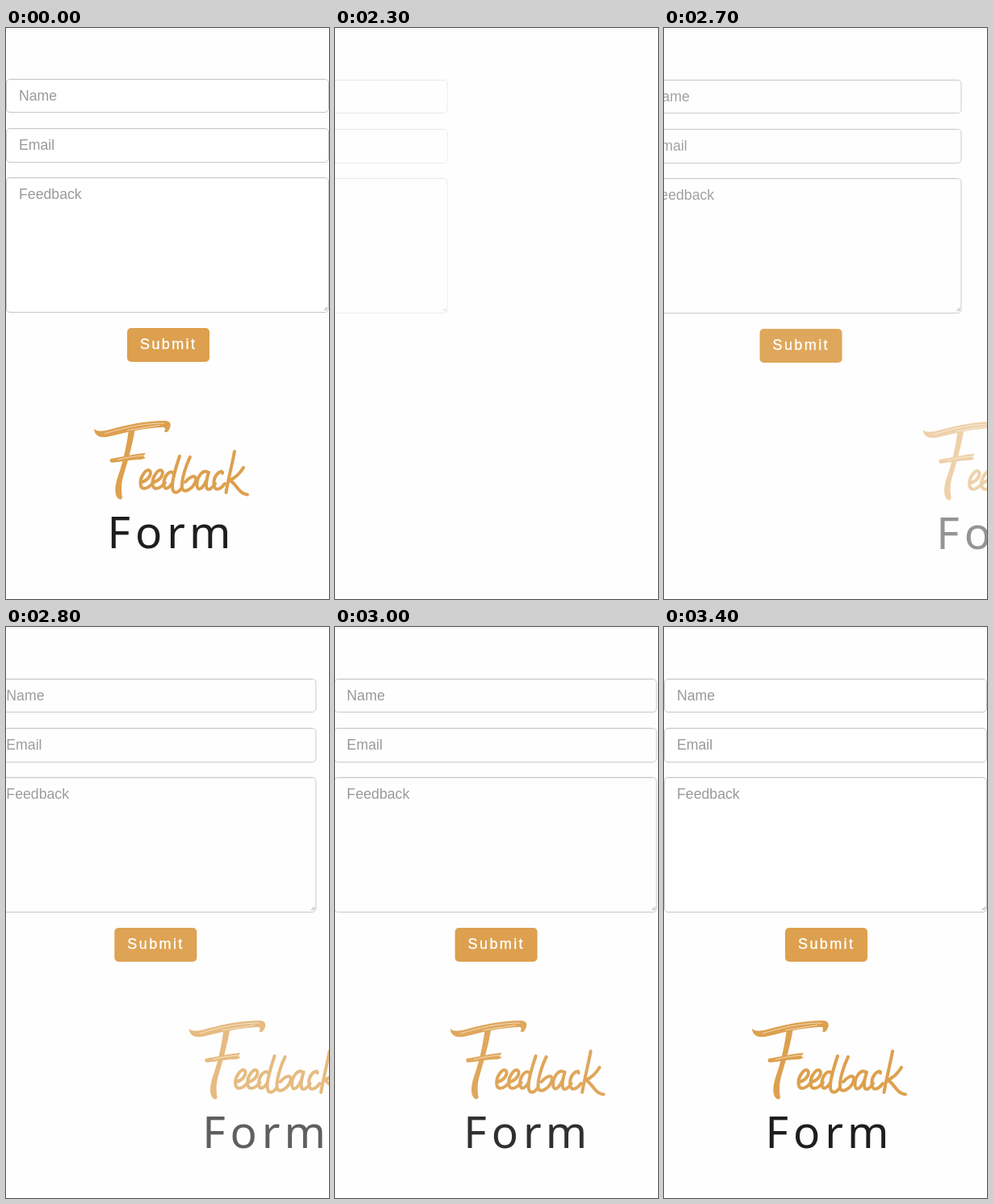
Recreate the animation shown at these times as an HTML page. Size 400 by 708 pixels, loop 3600 ms.

```html
<!DOCTYPE html>
<html lang="en">
<head>
<meta charset="utf-8">
<title>Feedback form</title>
<style>
  html, body { margin: 0; width: 100%; height: 100%; overflow: hidden; background: #fefefe; }
  svg { display: block; width: 100%; height: 100%; }
  text { font: 17.7px "Liberation Sans", Arial, sans-serif; fill: #999; }
  .field { fill: #fff; stroke: #c8c8c8; }
  .shade { fill: none; stroke: #f0f0f0; }
  .ink { fill: #dda04e; }
  .pen { fill: none; stroke: #dda04e; stroke-width: 4; stroke-linecap: round; stroke-linejoin: round; }
  .scratch { fill: none; stroke: #fefefe; stroke-width: .8; opacity: .75; }
  .submit { font-size: 18px; letter-spacing: 2.4px; fill: #fff; stroke: #fff; stroke-width: .35px; }
  .word { font: 55px "Noto Sans", "Open Sans", sans-serif; fill: #1e1e20; }
</style>
</head>
<body>
<svg viewBox="0 0 400 708" preserveAspectRatio="none">
  <path d="M0 1.5H400" stroke="#f3f3f3"/>
  <rect id="thumb" x="392" y="458" width="3" height="72" fill="#bbb"/>

  <g id="form">
    <rect class="field" x=".5" y="63.5" width="399" height="41" rx="4.5"/>
    <rect class="field" x=".5" y="124.5" width="399" height="42" rx="4.5"/>
    <rect class="field" x=".5" y="185.5" width="399" height="167" rx="4.5"/>
    <path class="shade" d="M4 64.5H396M4 125.5H396M4 186.5H396"/>
    <path d="M394 350l4-4M396.500 350l1.500-1.500" stroke="#777" stroke-width=".8"/>
    <text x="16" y="89.500">Name</text>
    <text x="16" y="150.500">Email</text>
    <text x="16" y="211.500">Feedback</text>
    <rect class="ink" x="150" y="372" width="102" height="42" rx="5"/>
    <text class="submit" x="166" y="398">Submit</text>
  </g>

  <g id="heading">
    <g class="ink">
      <path d="M109 497C113 501 120 500 128 498C150 492 172 487 196 487C205 487 205 493 202 498C200 502 197 502 196 500C198 497 197 495 194 495C172 496 150 501 130 506C118 509 110 507 109 497Z"/>
      <path d="M152 497L160 496C157 515 152 533 147 550C143 562 142 570 144 582C143 586 139 585 137 581C133 573 137 560 141 549C146 533 150 515 152 497Z"/>
      <path d="M130 534C143 532 158 528 173 527L170 531L173 533L168 535C155 535 142 538 131 539C128 538 128 535 130 534Z"/>
    </g>
    <path class="scratch" d="M122 503C145 496 170 490 196 490M150 499L190 492.500M138 535.500C150 532 160 531 170 530"/>
    <g class="pen">
      <path id="e" d="M168 563C176 561 181 553 178 549C174 546 166 556 166.500 565C167 574 175 572 182 564"/>
      <use href="#e" x="15"/>
      <path d="M207 552C203 547 195 556 195.500 566C196 574 202 571 206 564M215 531C211 543 206 558 206 568C206 578 212 578 218 570"/>
      <path d="M228 532C223 542 217 560 218 570C219 578 232 572 235 561C236 555 231 553 222 563"/>
      <path d="M250 551C244 546 236 557 236.500 567C237 575 244 572 249 559M251 551C248 560 246 572 251 572C254 572 257 568 259 565"/>
      <path d="M268 552C268 547 259 552 257.500 562C256.500 575 264 574 271 565"/>
      <path d="M283 525C280 542 275 560 272.500 576M294 545C290 552 283 558 277 561C284 563 288 578 299 578.500"/>
    </g>
    <text class="word" x="125.600 160 199.300 227" y="644.500">Form</text>
  </g>
</svg>
<script>
const LOOP = 3600, STEP = 100, HIDE = 1800, SHOW = 2200, WIDTH = 400;
const [form, heading, thumb] = ['form', 'heading', 'thumb'].map(id => document.getElementById(id));

// [time in ms, progress] pairs: the pace of each slide before easing
const formPace = [[2065, 0], [2500, .414], [2700, .66], [2900, .842], [3100, 1]];
const headingPace = [[2440, 0], [2700, .279], [2900, .555], [3200, .84], [3360, 1]];

function along(pace, t) {
  if (t <= pace[0][0]) return 0;
  for (let i = 1; i < pace.length; i++) {
    const [t0, p0] = pace[i - 1], [t1, p1] = pace[i];
    if (t < t1) return p0 + (p1 - p0) * (t - t0) / (t1 - t0);
  }
  return 1;
}

// cubic-bezier(.25, .1, .25, 1)
function ease(p) {
  const bezier = (s, a, b) => 3 * s * (1 - s) ** 2 * a + 3 * s * s * (1 - s) * b + s ** 3;
  let lo = 0, hi = 1;
  for (let i = 0; i < 24; i++) {
    const mid = (lo + hi) / 2;
    if (bezier(mid, .25, .25) < p) lo = mid; else hi = mid;
  }
  return bezier(hi, .1, 1);
}

function place(el, progress, side, y) {
  el.setAttribute('transform', `translate(${side * WIDTH * (1 - progress)} ${y})`);
  el.setAttribute('opacity', progress);
}

function draw(now) {
  const t = Math.floor(now % LOOP / STEP) * STEP;
  const still = t < HIDE, blank = !still && t < SHOW;
  const progress = pace => still ? 1 : blank ? 0 : ease(along(pace, t));
  const y = still ? 0 : 1;
  place(form, progress(formPace), -1, y);
  place(heading, progress(headingPace), 1, y);
  thumb.setAttribute('opacity', blank ? 1 : 0);
  requestAnimationFrame(draw);
}

let start;
requestAnimationFrame(function begin(now) {
  start = now;
  const tick = time => draw(time - start);
  const raf = window.requestAnimationFrame.bind(window);
  window.requestAnimationFrame = () => raf(tick);
  tick(now);
});
</script>
</body>
</html>
```
